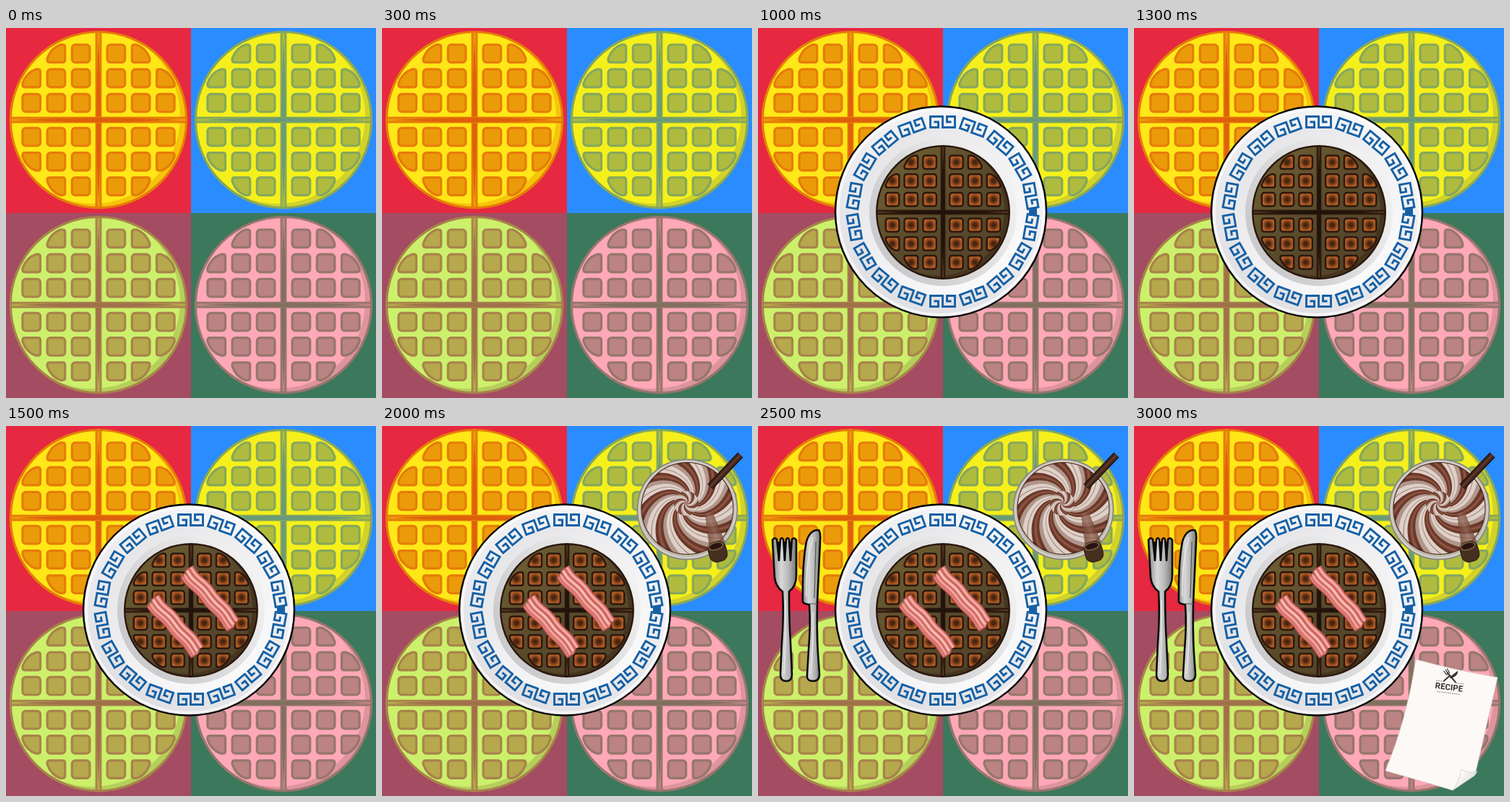
These frames come from a looping animation (512 by 512 pixels, 3.5 s). An HTML page with a canvas:

```html
<!DOCTYPE html>
<html lang="en">
<head>
<meta charset="utf-8">
<title>Waffle breakfast</title>
<style>
  html, body { margin: 0; width: 100%; height: 100%; overflow: hidden; }
  canvas { display: block; width: 512px; height: 512px; }
</style>
</head>
<body>
<canvas id="stage" width="512" height="512"></canvas>
<script>
const ctx = document.getElementById('stage').getContext('2d');
const TAU = Math.PI * 2;
const STEP = 500, STEPS = 7;

function at(x, y, angle, scale, draw) {
  ctx.save();
  ctx.translate(x, y);
  ctx.rotate(angle);
  ctx.scale(scale, scale);
  draw();
  ctx.restore();
}

function paint(fill, stroke, width, path) {
  if (fill) { ctx.fillStyle = fill; path ? ctx.fill(path) : ctx.fill(); }
  if (stroke) {
    ctx.strokeStyle = stroke;
    ctx.lineWidth = width;
    path ? ctx.stroke(path) : ctx.stroke();
  }
}

function disc(x, y, r, fill, stroke, width) {
  ctx.beginPath();
  ctx.arc(x, y, r, 0, TAU);
  paint(fill, stroke, width);
}

function withStops(gradient, colors) {
  colors.forEach((c, i) => gradient.addColorStop(i / (colors.length - 1), c));
  return gradient;
}
const linear = (x0, y0, x1, y1, ...colors) =>
  withStops(ctx.createLinearGradient(x0, y0, x1, y1), colors);
const radial = (r, ...colors) =>
  withStops(ctx.createRadialGradient(0, 0, 0, 0, 0, r), colors);

// Waffles

const fullCell = new Path2D();
fullCell.roundRect(-12.3, -12.3, 24.6, 24.6, 4.5);
const cutCell = new Path2D(
  'M-9-12.3H9Q12.3-12.3 12.3-9V-7Q7 8-6 12.3H-9Q-12.3 12.3-12.3 9V-9Q-12.3-12.3-9-12.3Z');

function grooves(p) {
  for (const angle of [0, Math.PI / 2]) {
    at(0, 0, angle, 1, () => {
      ctx.fillStyle = p.edge;
      ctx.fillRect(-4.4, -121, 8.8, 242);
      ctx.fillStyle = p.groove;
      ctx.fillRect(-1.6, -120, 3.2, 240);
      ctx.beginPath();
      ctx.moveTo(0, -112);
      ctx.quadraticCurveTo(6, 0, 0, 112);
      ctx.quadraticCurveTo(-6, 0, 0, -112);
      paint(p.line);
    });
  }
}

function cells(p) {
  for (const sx of [-1, 1]) for (const sy of [-1, 1])
    for (let row = 0; row < 3; row++) for (let col = 0; col < 3; col++) {
      if (row + col === 4) continue;
      const shape = row + col === 3 ? cutCell : fullCell;
      ctx.save();
      ctx.translate(sx * (24.4 + 34.2 * col), sy * (23.5 + 34.2 * row));
      ctx.scale(sx, sy);
      paint(p.cell, p.edge, 3.2, shape);
      ctx.restore();
    }
}

function waffle(x, y, scale, p) {
  at(x, y, 0, scale, () => {
    ctx.save();
    disc(0, 0, 122, p.shade);
    ctx.clip();
    disc(-8, -5, 121, p.body);
    ctx.restore();
    grooves(p);
    cells(p);
    disc(0, 0, 121.7, null, p.edge, 3.2);
  });
}

const palettes = [
  { bg: '#e62840', body: '#ffe718', shade: '#f6c40c', cell: '#eb9b0a', edge: '#e67c08', groove: '#eb9b0a', line: '#de5f0c' },
  { bg: '#2a8cff', body: '#f5f01c', shade: '#d2d22a', cell: '#afbb3f', edge: '#86a85c', groove: '#afbb3f', line: '#6a9a78' },
  { bg: '#a44c62', body: '#ccf06c', shade: '#b6cf5c', cell: '#b6a84c', edge: '#a8834a', groove: '#b6a84c', line: '#a0704c' },
  { bg: '#3c785c', body: '#ffa8b8', shade: '#dd949e', cell: '#bb8383', edge: '#96766c', groove: '#bb8383', line: '#80705f' }
];
const chocolate = {
  body: linear(-80, -80, 80, 80, '#6a5a31', '#5a4a2c', '#54442a'), shade: '#45351f',
  cell: radial(15, '#41230f', '#4d2813', '#8c461b', '#b9622a', '#8c461b'),
  edge: '#2b180d', groove: '#54351f', line: '#21130b'
};

function background() {
  palettes.forEach((p, i) => {
    const x = i % 2 * 256, y = (i >> 1) * 256;
    ctx.fillStyle = p.bg;
    ctx.fillRect(x, y, 256, 256);
    waffle(x + 128, y + 127.2, 1, p);
  });
}

// Plate with a fret of paired square spirals

const fret = new Path2D('M-12 0H-6V7.5H-17V-7.5H0V7.5H17V-7.5H6V0H12');

function plate() {
  disc(253, 254.5, 146, linear(320, 130, 180, 380, '#f5f5f7', '#ececef', '#e0e0e4'), '#000', 2.4);
  disc(253, 254.5, 142, null, '#ffffffb0', 3);
  disc(256, 254, 117, linear(170, 170, 330, 350, '#e6e6e9', '#f1f1f3', '#fafafb'));
  disc(256, 255, 102, linear(180, 300, 335, 200, '#cbcbce', '#dededf', '#f1f1f2'));
  ctx.lineJoin = 'miter';
  for (let i = 0; i < 18; i++)
    at(255.5, 254, i * TAU / 18, 1, () => {
      ctx.translate(0, -124);
      paint(null, '#1560a5', 2.9, fret);
    });
  ctx.lineJoin = 'round';
  ctx.fillStyle = '#1560a5';
  ctx.fillRect(375, 249, 11, 11);
}

// Bacon

function wave(length, offset, backwards) {
  for (let x = 0; x <= length; x += 2) {
    const u = backwards ? length - x : x;
    ctx.lineTo(u, offset + Math.sin(u / 7) + .6 * Math.sin(u / 12));
  }
}

function bacon(x, y, length) {
  at(x, y, .845, 1, () => {
    ctx.beginPath();
    wave(length, -11.5);
    ctx.lineTo(length - 2, -4);
    ctx.lineTo(length + 2, 2);
    wave(length, 11.5, true);
    ctx.lineTo(3, 5);
    ctx.lineTo(-2, 0);
    ctx.closePath();
    paint('#e5837c', '#b04f4d', 1.5);
    const streaks = [[-8, '#f4b5ab', 2.2], [-4.5, '#c45b59', 1.8], [-1, '#f6c6ba', 2.6],
      [2.5, '#cb6562', 1.6], [5.2, '#f1aea4', 2], [8.3, '#d0706a', 1.6]];
    for (const [offset, color, width] of streaks) {
      ctx.beginPath();
      wave(length - 1, offset);
      paint(null, color, width);
    }
  });
}

function baconPair() {
  bacon(203, 241, 95);
  bacon(250, 201, 99);
}

// Hot chocolate seen from above

function swirlArm(start, spread, color) {
  const edge = (r, shift) => {
    const a = start + shift - 2.4 * Math.sqrt(r / 62);
    ctx.lineTo(r * Math.cos(a), r * Math.sin(a));
  };
  ctx.beginPath();
  for (let r = 2; r <= 76; r += 2) edge(r, 0);
  for (let r = 76; r >= 2; r -= 2) edge(r, spread);
  paint(color);
}

function swirl(arms) {
  const gap = TAU / arms;
  for (let i = 0; i < arms; i++) {
    const a = i * gap;
    swirlArm(a, gap * .52, '#ddd0c8');
    swirlArm(a + gap * .4, gap * .2, '#b0958a');
    swirlArm(a + gap * .16, gap * .04, '#a4887c');
    swirlArm(a + gap * .74, gap * .12, '#8b5442');
  }
}

function tube(x0, y0, x1, y1, width) {
  for (const [w, color] of [[width, '#24130d'], [width - 3, '#45271c'], [1.5, '#694235']]) {
    ctx.beginPath();
    ctx.moveTo(x0, y0);
    ctx.lineTo(x1, y1);
    paint(null, color, w);
  }
}

function drink() {
  disc(422.5, 115.5, 69.3, '#b9b6ad', '#85847f', 1.5);
  disc(422.5, 115.5, 66.5, null, '#d5d0c8', 2);
  disc(422.5, 114, 63, '#6b3829', '#4d281d', 2);
  ctx.save();
  ctx.clip();
  at(421, 107, 0, 1, () => swirl(8));
  disc(421, 107, 17, '#6b3829');
  ctx.clip();
  at(421, 107, .4, .3, () => swirl(6));
  ctx.restore();
  tube(454, 84, 496, 40, 10);
  ctx.beginPath();
  ctx.moveTo(447, 122);
  ctx.lineTo(457, 118);
  ctx.lineTo(475, 161);
  ctx.lineTo(453, 169);
  ctx.closePath();
  paint(linear(450, 150, 471, 143, '#6b4032c0', '#936454c0', '#5b3526c0'));
  at(464, 174, -.25, 1, () => {
    ctx.beginPath();
    ctx.roundRect(-12, -14, 25, 28, 10);
    paint('#45301f', '#33200f', 1);
    ctx.beginPath();
    ctx.ellipse(0, -8, 10, 5, 0, 0, TAU);
    paint('#2a160f', '#80604a', 1.5);
  });
}

// Cutlery

const forkShape = new Path2D(
  'M20 158Q23 153 26 157L29 185L31 157Q33 153 35 157L37 185L39 157Q41 153 43 157' +
  'L45 185L47 157Q50 153 53 158L53 207Q53 222 43 229Q43 270 45 300L47 344Q47 353 39 353' +
  'Q31 353 31 344L33 300Q36 260 34 229Q25 223 23 210Z');
const knifeShape = new Path2D(
  'M62 244Q61 190 67 160Q72 143 84 144Q87 147 86 160L82 245Q81 285 83 315' +
  'L85 344Q85 353 76 353Q67 353 68 344L70 310Q73 275 71 247Q66 247 62 244Z');

function cutlery() {
  const metal = (x0, x1) => linear(x0, 0, x1, 0, '#8e8e8e', '#d9d9d9', '#b4b4b4', '#707070');
  paint(metal(21, 54), '#0c0c0c', 2.6, forkShape);
  paint(null, '#0c0c0c', 2.6, new Path2D('M29 160V187M37 160V187M45 160V187'));
  paint(metal(62, 87), '#0c0c0c', 2.6, knifeShape);
  paint(null, '#e8e8e8', 1.5, new Path2D('M38 240Q39 290 36 343M67 236Q66 190 76 154M76 258Q77 300 73 343'));
  paint(null, '#555555', 1.2, new Path2D('M71 246H82M80 160L78 238'));
}

// Recipe sheet

function crossedCutlery() {
  ctx.lineCap = 'round';
  paint(null, '#333333', 2, new Path2D('M-5-5L8 7M-1-1L-8 7'));
  paint(null, '#333333', 1.1, new Path2D('M-10-6L-6-2L-3-3M-8-8L-4-4M-6-10L-2-5'));
  paint('#333333', null, 0, new Path2D('M-1 1L9-9Q11-3 1 3Z'));
  ctx.lineCap = 'butt';
}

function recipe() {
  paint('#fdf9f6', '#d8d2cd', .8, new Path2D(
    'M390 323Q440 337 503 348Q490 405 472 482L441 504Q397 491 348 477Q378 405 390 323Z'));
  paint(linear(448, 482, 467, 498, '#ffffff', '#dcdadd'), '#cfcbca', .8, new Path2D(
    'M441 504Q450 492 453 475Q463 482 475 478L471 484Z'));
  at(436, 361.5, .13, 1, () => {
    ctx.fillStyle = '#333333';
    ctx.font = 'bold 11.5px Roboto, sans-serif';
    ctx.textAlign = 'center';
    ctx.textBaseline = 'middle';
    ctx.fillText('RECIPE', 0, .5);
    ctx.setLineDash([2, 1]);
    paint(null, '#666666', .8, new Path2D('M-19-7H-8M9-7H20M-16 8H17'));
    ctx.setLineDash([]);
    ctx.translate(0, -15);
    crossedCutlery();
  });
}

const layers = [
  background, plate, () => waffle(256, 255, .754, chocolate),
  baconPair, drink, cutlery, recipe
];

let shown = -1;
function frame() {
  const step = Math.floor(performance.now() / STEP) % STEPS;
  if (step !== shown) {
    shown = step;
    ctx.lineJoin = 'round';
    layers.slice(0, step + 1).forEach(draw => draw());
  }
  requestAnimationFrame(frame);
}
frame();
</script>
</body>
</html>
```
